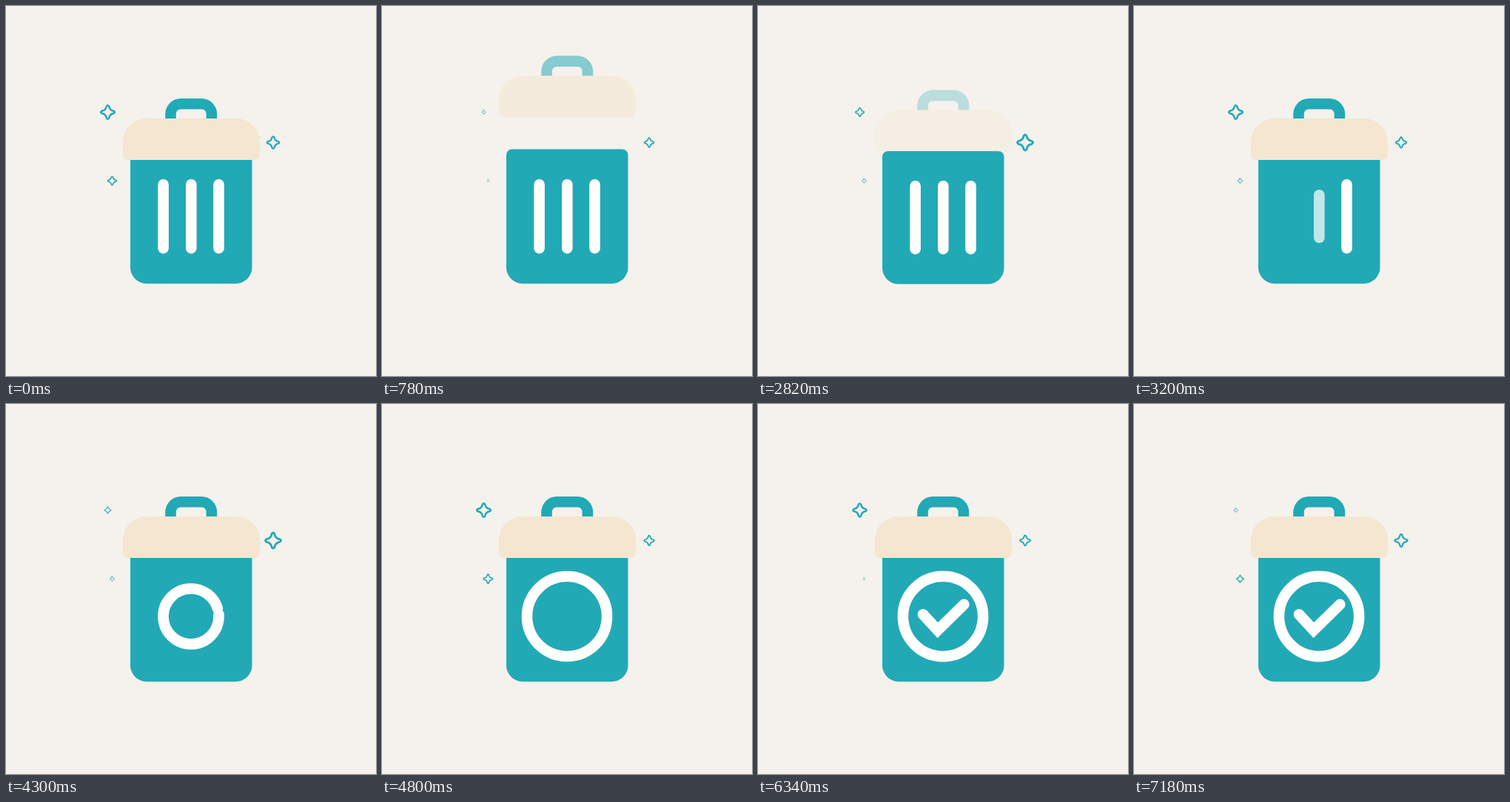
An HTML page with a canvas that plays this animation: 500 by 500 pixels, repeating every 7.2 s.

```html
<!DOCTYPE html>
<html lang="en">
<head>
<meta charset="utf-8">
<title>Bin</title>
<style>
  html, body { margin: 0; width: 100%; height: 100%; overflow: hidden; background: #f5f1ec; }
  canvas { display: block; width: 500px; height: 500px; }
</style>
</head>
<body>
<canvas id="stage" width="500" height="500"></canvas>
<script>
const LOOP = 7200, TEAL = '#22a9b6', CREAM = '#f5e6d0', WHITE = '#fff', PAPER = '#f5f1ec';
const c = document.getElementById('stage').getContext('2d');

const span = (t, a, b) => Math.min(1, Math.max(0, (t - a) / (b - a)));
const inOut = p => p < .5 ? 2 * p * p : 1 - 2 * (1 - p) ** 2;
const out = p => 1 - (1 - p) ** 3;
const mix = (a, b, p) => a + (b - a) * p;
const pulse = (t, a, b) => Math.sin(Math.PI * span(t, a, b));

function box(x, y, w, h, r, color) {
  c.beginPath();
  c.roundRect(x, y, w, h, r);
  c.fillStyle = color;
  c.fill();
}

function stroke(color, width) {
  c.strokeStyle = color;
  c.lineWidth = width;
  c.stroke();
}

function group(draw, alpha = 1) {
  c.save();
  c.globalAlpha = alpha;
  draw();
  c.restore();
}

// Each star swells around a mean radius with its own period.
const stars = [
  { x: 137.5, y: 143.5, mean: 6.9, amp: 3.8, period: 1600, peak: 40 },
  { x: 361, y: 184.5, mean: 8.4, amp: 3.65, period: 1560, peak: 1240 },
  { x: 143.4, y: 236.2, mean: 5.2, amp: 3.2, period: 1120, peak: 195, max: 7 }
];

function drawStar(s, t) {
  const wave = s.mean + s.amp * Math.cos(2 * Math.PI * (t - s.peak) / s.period);
  const size = Math.min(s.max || 99, wave) / 10.5;
  group(() => {
    c.translate(s.x, s.y);
    c.scale(size, size);
    c.beginPath();
    for (let i = 0; i < 4; i++) {
      c.lineTo(-1.6, -8);
      c.quadraticCurveTo(0, -10.4, 1.6, -8);
      c.quadraticCurveTo(2.5, -2.5, 8, -1.6);
      c.rotate(Math.PI / 2);
    }
    c.closePath();
    stroke(TEAL, 2.5);
  });
}

// Scraps slide along a curve (start, bend, end) into the bin.
const scraps = [
  { x: [298, 266, 262], y: [157, 186, 225], start: 1365, time: 705 },
  { x: [193, 199, 208], y: [138, 154, 215], start: 1412, time: 600 },
  { x: [240, 243, 246], y: [140, 160, 220], start: 1690, time: 580 }
];
const curve = ([a, b, d], u) => (1 - u) ** 2 * a + 2 * u * (1 - u) * b + u * u * d;

function drawScrap(s, t) {
  const p = span(t, s.start, s.start + s.time);
  if (p <= 0 || p >= 1) return;
  group(() => {
    c.beginPath();
    for (let i = 0; i <= 6; i++) {
      const u = p * p + .25 * i / 6;
      c.lineTo(curve(s.x, u), curve(s.y, u));
    }
    stroke(TEAL, 12);
  }, span(t, s.start, s.start + 315));
}

function drawStripe(x, p) {
  if (p >= 1) return;
  group(() => {
    c.beginPath();
    c.moveTo(x, 284.3 - 50.4 * (1 - p) + 7.3);
    c.lineTo(x, 284.3 + 50.4 * (1 - p) - 7.3);
    stroke(WHITE, 14.6);
  }, 1 - p);
}

// The right stripe bends, winds into a ring, and the ring widens.
function drawRing(t) {
  const wind = inOut(span(t, 3500, 4460));
  const bend = inOut(span(t, 3500, 3800));
  const grow = out(span(t, 4480, 4860));
  c.beginPath();
  if (bend === 0) {
    c.moveTo(287.5, 241.2);
    c.lineTo(287.5, 327.4);
  } else if (wind < 1) {
    const r = 37.5 / bend;
    c.moveTo(287.5, mix(241.2, 287, wind));
    c.arc(287.5 - r, 287, r, 0, mix(40.4, 37.5 * 2 * Math.PI, wind) / r);
  } else {
    c.arc(250, 287, mix(37.5, 54.1, grow), 0, 2 * Math.PI);
  }
  stroke(WHITE, 14.6);
}

function drawCheck(t) {
  const p = inOut(span(t, 4850, 5350));
  if (p === 0) return;
  group(() => {
    c.lineJoin = 'miter';
    c.setLineDash([79.5 * p, 200]);
    c.beginPath();
    c.moveTo(223, 284.2);
    c.lineTo(242.8, 305.7);
    c.lineTo(278.3, 270.9);
    stroke(WHITE, 14.6);
  });
}

function drawLid(t) {
  const up = inOut(span(t, 450, 950));
  const down = out(span(t, 2680, 2980));
  const alpha = t < 1500 ? 1 - span(t, 600, 980) : span(t, 2680, 3180);
  if (alpha === 0) return;
  group(() => {
    c.translate(0, -75 * (up - down));
    box(158, 152, 185, 56, [32, 32, 7, 7], CREAM);
    c.beginPath();
    c.roundRect(215.2, 125, 70, 27, [21, 21, 0, 0]);
    c.roundRect(229.8, 139.6, 40.8, 12.4, [6, 6, 0, 0]);
    c.fillStyle = TEAL;
    c.fill('evenodd');
  }, alpha);
}

function drawBin(t) {
  const landing = pulse(t, 2740, 3140);
  const squash = .018 * landing + .015 * pulse(t, 180, 520)
    + .01 * pulse(t, 4440, 4760) + .01 * pulse(t, 5180, 5480);
  group(() => {
    c.translate(0, 375 + landing);
    c.scale(1, 1 - squash);
    c.translate(0, -375);
    box(168, 193.4, 164.5, 181.8, [8, 8, 22, 22], TEAL);
    drawStripe(212.6, inOut(span(t, 2946, 3196)));
    drawStripe(250.3, inOut(span(t, 3106, 3356)));
    drawRing(t);
    drawCheck(t);
  });
  group(() => {
    c.translate(0, 180 * squash * (t < 2000 || t > 4000));
    drawLid(t);
  });
}

function render(now) {
  const t = now % LOOP;
  c.fillStyle = PAPER;
  c.fillRect(0, 0, 500, 500);
  c.lineCap = c.lineJoin = 'round';
  stars.forEach(s => drawStar(s, t));
  scraps.forEach(s => drawScrap(s, t));
  drawBin(t);
}

let begin;
function tick(now) {
  begin ??= now;
  render(now - begin);
  requestAnimationFrame(tick);
}
requestAnimationFrame(tick);
</script>
</body>
</html>
```
